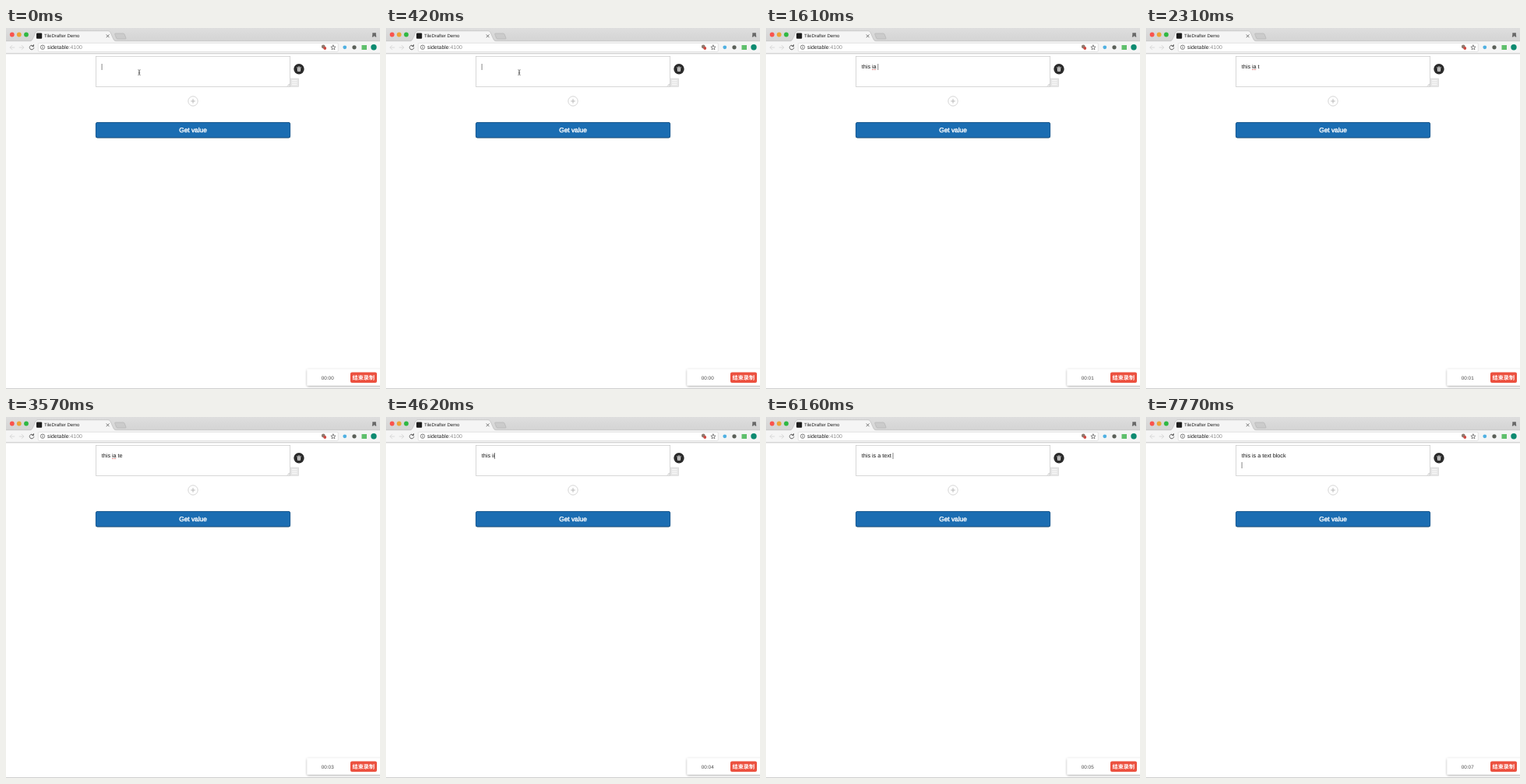
Write an HTML page that moves like this. It is 480 by 464 pixels and loops after 8000 ms.

```html
<!DOCTYPE html>
<html lang="en">
<head>
<meta charset="utf-8">
<title>TileDrafter Demo</title>
<style>
  html, body { margin: 0; width: 100%; height: 100%; overflow: hidden; background: #fff; }
  svg { display: block; width: 100vw; height: 100vh; }
  text {
    font-family: "Liberation Sans", Arial, sans-serif;
    text-rendering: geometricPrecision;
    white-space: pre;
  }
  .line { fill: none; stroke-linecap: round; stroke-linejoin: round; }
</style>
</head>
<body>
<svg viewBox="0 0 480 464" preserveAspectRatio="none">
  <defs>
    <linearGradient id="strip" x2="0" y2="1">
      <stop offset="0" stop-color="#dedede"/>
      <stop offset="1" stop-color="#d3d3d3"/>
    </linearGradient>
    <filter id="shadow" x="-10%" y="-30%" width="120%" height="170%">
      <feDropShadow dx="0" dy="1" stdDeviation="1.6" flood-color="#000" flood-opacity=".38"/>
    </filter>
  </defs>

  <!-- window frame and tabs -->
  <rect width="480" height="464" fill="#fff"/>
  <rect width="480" height="18" fill="url(#strip)"/>
  <circle cx="7.800" cy="8.500" r="2.900" fill="#f9544d"/>
  <circle cx="16.800" cy="8.500" r="2.900" fill="#eda536"/>
  <circle cx="26" cy="8.500" r="2.900" fill="#2fb842"/>
  <path d="M140.500 7h10q1 0 1.500 1l2 5q.3 1-.8 1h-10q-1 0-1.500-1l-2-5q-.3-1 .8-1z" fill="#cbcbcb" stroke="#b0b0b0" stroke-width=".6"/>
  <path d="M-1 16.700H31q2 0 3-2l4-9q1-2 3-2h90q2 0 3 2l4 9q1 2 3 2H481V33H-1z" fill="#f5f5f5" stroke="#b8b8b8" stroke-width=".6"/>
  <rect x="39" y="6.500" width="7.200" height="7.200" rx="1" fill="#1c1c1c"/>
  <text x="49" y="12.300" font-size="6" fill="#222">TileDrafter Demo</text>
  <path class="line" d="M129 8.700l3.200 3.200m0-3.200l-3.200 3.200" stroke="#555" stroke-width=".8"/>
  <path d="M470.300 6.300h4.600v2.800l.5 2.300h-1.600l-1.200-1.300-1.200 1.300h-1.600l.5-2.300z" fill="#686868"/>

  <!-- toolbar -->
  <g class="line" stroke-width=".9">
    <path d="M10.800 25H5.200m2.600-2.600L5.200 25l2.600 2.600M17.200 25h5.600m-2.600-2.600l2.600 2.600-2.600 2.600" stroke="#d6d6d6"/>
    <path d="M35.200 23.200a2.800 2.800 0 1 0 .6 2.400M35.500 21.600v2h-2" stroke="#555"/>
  </g>
  <rect x="41.300" y="19.300" width="385" height="11.200" rx="1.500" fill="#fff" stroke="#d8d8d8" stroke-width=".7"/>
  <circle cx="47" cy="24.700" r="2.700" fill="none" stroke="#555" stroke-width=".7"/>
  <path d="M47 24.300v1.900M47 22.900v.7" stroke="#555" stroke-width=".8"/>
  <text x="53" y="27.100" font-size="6.900" fill="#222">sidetable<tspan fill="#8c8c8c">:4100</tspan></text>
  <circle cx="407.300" cy="24" r="2.400" fill="#8d7b70"/>
  <circle cx="409.300" cy="26" r="1.900" fill="#cf4a42"/>
  <path class="line" d="M420 22l.9 2 2.200.2-1.700 1.400.5 2.200-1.900-1.200-1.900 1.200.5-2.200-1.700-1.400 2.200-.2z" stroke="#555" stroke-width=".7"/>
  <circle cx="434.800" cy="24.800" r="2.400" fill="#4fb0e2"/>
  <circle cx="447" cy="24.800" r="2.600" fill="#5a5f58"/>
  <rect x="456.500" y="22" width="6.500" height="6" fill="#5fbf6c"/>
  <circle cx="472" cy="24.800" r="3.700" fill="#0d8a71"/>
  <path d="M0 32.500H480" stroke="#d6d6d6"/>

  <!-- editor block -->
  <rect x="115.400" y="36.500" width="249.200" height="39" fill="#fff" stroke="#cecece" stroke-width=".8"/>
  <path d="M361 74.700l3-3m-1.300 3l1.300-1.300" stroke="#888" stroke-width=".5"/>
  <rect x="365" y="65" width="10.500" height="10.300" fill="#e6e6e6" stroke="#d8d8d8" stroke-width=".7"/>
  <path d="M367 67.700h6.500m-6.500 2.500h6.500m-6.500 2.500h6.500" stroke="#fff" stroke-width=".9"/>
  <circle cx="376" cy="52.800" r="6.700" fill="#2b2b2b"/>
  <path class="line" d="M373.300 50.800h5.400m-3.500-.1v-.9h1.600v.9" stroke="#eee" stroke-width=".6"/>
  <path d="M373.800 51.600h4.400l-.3 4.200h-3.800z" fill="#eee"/>
  <path d="M375.300 52.500v2.500m1.400-2.500v2.500" stroke="#2b2b2b" stroke-width=".5"/>
  <circle cx="240" cy="94" r="6.200" fill="#fff" stroke="#cbcbcb" stroke-width=".8"/>
  <path d="M237.200 94h5.600M240 91.200v5.600" stroke="#aaa" stroke-width=".8"/>

  <text id="typed" x="122.800" y="51.900" font-size="7.200" fill="#111"></text>
  <path id="squiggle" d="M136 53.500h5.600" stroke="#d9605c" stroke-width=".8" stroke-dasharray="1 .4"/>
  <rect id="caret" width=".7" height="8" fill="#555"/>
  <path id="pointer" class="line" d="M169.700 53.700q1.300 0 1.300.9v5q0 .9-1.300.9M172.300 53.700q-1.300 0-1.300.9v5q0 .9 1.300.9M170.200 57.800h1.600" stroke="#444" stroke-width=".6"/>

  <!-- submit button -->
  <rect x="115" y="121" width="250" height="20.600" rx="2.500" fill="#174468"/>
  <rect x="115.300" y="121.400" width="249.400" height="19.300" rx="2.300" fill="#1b6db2" stroke="#1c5c94" stroke-width=".6"/>
  <text x="240" y="134.100" font-size="8.300" text-anchor="middle" fill="#fff" stroke="#fff" stroke-width=".4">Get value</text>

  <!-- recorder panel -->
  <rect x="386.500" y="438.500" width="98" height="21" rx="1" fill="#fff" filter="url(#shadow)"/>
  <text id="clock" x="404.800" y="451.700" font-size="6.350" fill="#4a4a4a">00:00</text>
  <rect x="442" y="442.500" width="34" height="13.500" rx="2" fill="#ec503f"/>
  <text x="458.800" y="452" font-size="7.100" font-weight="bold" text-anchor="middle" fill="#fff" style="font-family:'Noto Sans CJK SC','Noto Sans CJK',sans-serif">结束录制</text>
  <path d="M0 463.600H480" stroke="#bcbcbc" stroke-width=".8"/>
</svg>
<script>
const LOOP = 8000, BLINK = 560;
const byId = id => document.getElementById(id);
const [typed, caret, squiggle, pointer, clock] =
  ["typed", "caret", "squiggle", "pointer", "clock"].map(byId);

// [time, key]: "<" is backspace
const keys = [
  [560, "t"], [630, "h"], [770, "i"], [840, " "], [980, "<"], [1050, "s"], [1120, " "],
  [1260, "i"], [1400, "a"], [1540, " "], [1750, "t"], [2870, "e"],
  [3640, "<"], [3780, "<"], [3920, "<"], [4060, "<"],
  [4480, "i"], [4760, "<"], [4900, "s"], [5040, " "], [5180, "a"], [5320, " "],
  [5600, "t"], [5670, "e"], [5880, "x"], [6020, "t"], [6160, " "],
  [6440, "b"], [6580, "l"], [6720, "o"], [6860, "c"], [6930, "k"], [7490, "\n"]
];

function typedAt(t) {
  let text = "", last = 0;
  for (const [time, key] of keys) {
    if (time > t) break;
    text = key === "<" ? text.slice(0, -1) : text + key;
    last = time;
  }
  return { text, last };
}

const show = (el, on) => el.setAttribute("visibility", on ? "visible" : "hidden");

function draw(t) {
  const { text, last } = typedAt(t);
  const newLine = text.endsWith("\n");
  typed.textContent = newLine ? text.slice(0, -1) : text;
  const width = newLine || !text ? 0 : typed.getComputedTextLength();
  caret.setAttribute("x", 122.7 + width);
  caret.setAttribute("y", newLine ? 58 : 46);
  show(caret, (t - last) % (2 * BLINK) < BLINK);
  show(squiggle, t >= 1540 && text.startsWith("this ia"));
  show(pointer, t < keys[0][0]);
  clock.textContent = "00:0" + Math.max(0, Math.floor((t - 420) / 1050));
}

const start = performance.now();
function tick() {
  draw((performance.now() - start) % LOOP);
  requestAnimationFrame(tick);
}
tick();
</script>
</body>
</html>
```
